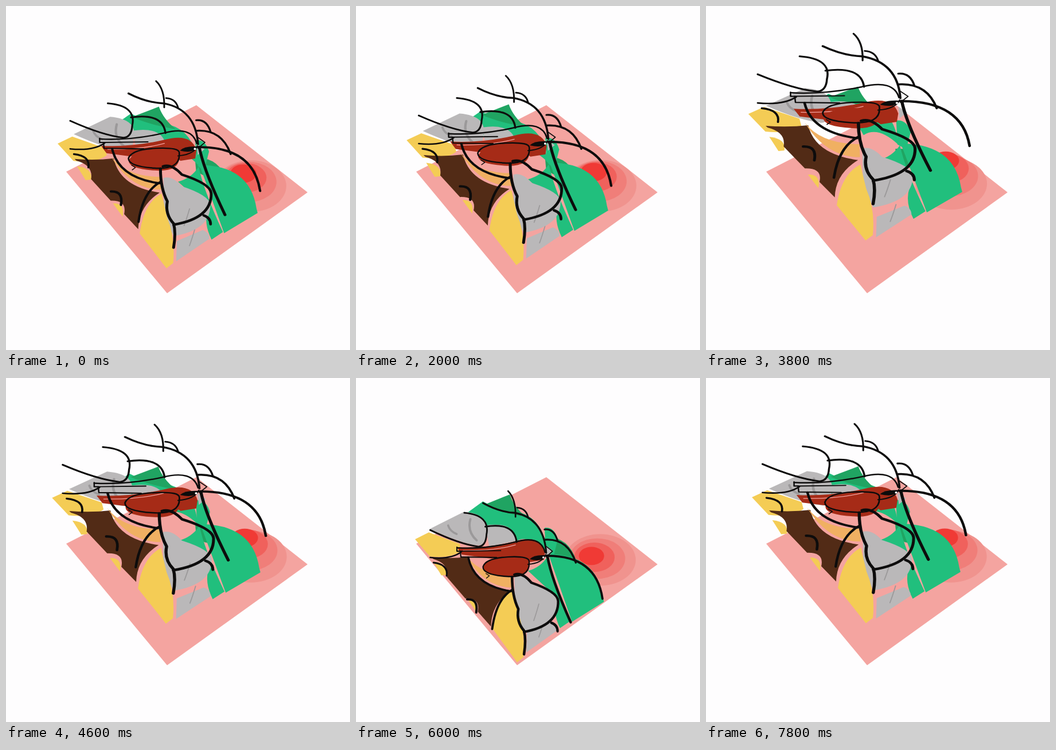
Recreate the animation shown at these times as an HTML page. Size 600x600 px, loop 8 s.

```html
<!DOCTYPE html>
<html lang="en">
<head>
<meta charset="utf-8">
<title>Layered bird</title>
<style>
html, body { margin: 0; width: 100%; height: 100%; overflow: hidden; background: #fefdfe; }
svg { display: block; width: 100%; height: 100%; }
</style>
</head>
<body>
<svg id="stage" viewBox="0 0 600 600"></svg>
<script>
const NS = 'http://www.w3.org/2000/svg';
const stage = document.getElementById('stage');
const INK = '#0d0c0c', GREEN = '#21bf7d', DARK = '#20a462', GREY = '#bab8b9',
      SHADE = '#9b999a', YELLOW = '#f4cc55', PEACH = '#f0b062', BROWN = '#522b16',
      RED = '#a62b17', PINK = '#f4a4a0';

function add(parent, tag, attrs) {
  const el = document.createElementNS(NS, tag);
  for (const k in attrs) el.setAttribute(k, attrs[k]);
  parent.appendChild(el);
  return el;
}

const layers = [];
function layer(rise) {
  const g = add(stage, 'g', {});
  layers.push({ g, rise });
  return g;
}

const ink = layer(1);
const fill = (g, color, d) => add(g, 'path', { d, fill: color });

// Strokes get heavier towards the viewer, judged by the y where they end
function pen(d, weight = 1, g = ink, color = INK) {
  const y = +d.match(/\d+$/)[0];
  add(g, 'path', {
    d, fill: 'none', stroke: color, 'stroke-width': weight * (2.4 + (y - 200) * .008),
    'stroke-linecap': 'round', 'stroke-linejoin': 'round'
  });
}

// A colour patch: the edge is also drawn in the ink layer, the rest only closes the fill
function patch(g, color, edge, rest = '', weight = 1) {
  fill(g, color, edge + rest + 'Z');
  pen(edge, weight);
}

function drawSun() {
  for (let i = 0; i < 4; i++) {
    const tone = 147 - 16 * i - 4.6 * i * i;
    add(layer(.05 + .077 * i), 'ellipse', {
      cx: 426 - 5 * i, cy: 317 - 2.7 * i, rx: 62 - 13.3 * i, ry: 45 - 9.7 * i,
      fill: `rgb(240,${tone},${tone - 5})`
    });
  }
}

function drawLeaves() {
  patch(layer(.2), DARK, 'M329 277Q370 274 384 317', 'L345 308L331 300');
  const far = layer(.42), near = layer(.47);
  patch(far, GREEN, 'M221 213Q250 229 277 230Q328 240 332 300',
    'Q300 268 277 284Q262 250 228 256L188 237');
  fill(far, DARK, 'M223 219L268 201Q275 222 296 240Q250 232 223 219Z');
  patch(far, GREEN, 'M329 259Q346 257 352 279', 'L345 308L331 300');
  patch(near, GREEN, 'M334 305Q341 345 375 421',
    'L356 434Q342 405 350 380L300 334Q322 328 334 309', 1.1);
  patch(near, GREEN, 'M332 305Q420 304 431 380', 'L433 388L377 423L338 311');
  pen('M265 192Q279 206 278 237');
  pen('M281 221Q296 222 300 237');
}

function drawStones() {
  const low = layer(.55), mid = layer(.61), high = layer(.65);
  patch(low, GREY, 'M341 422Q352 426 352 437', 'L297 476L298 441');
  patch(mid, GREY, 'M188 230Q234 234 227 268Q226 288 213 289Q180 285 128 260');
  patch(mid, GREY, 'M225 254Q276 246 280 281', 'L232 291');
  patch(high, GREY, 'M276 338Q290 333 306 352Q352 368 353 384Q354 427 293 438',
    'Q286 425 277 395');
  const crack = (g, x, y, w) => pen(`M${x} ${y}q-5 18 -9 29`, w, g, SHADE);
  pen('M199 243Q193 265 210 280', 1.3, mid, SHADE);
  pen('M160 254Q163 264 175 269', 1.2, mid, SHADE);
  crack(high, 319, 391, 1.6);
  crack(low, 328, 420, 1.6);
}

function drawEarth() {
  const sand = layer(.64), soil = layer(.72);
  patch(sand, YELLOW, 'M128 308Q165 312 183 298', 'L180 286L126 266L102 278', .8);
  patch(soil, BROWN, 'M195 308Q205 357 270 367',
    'Q236 390 235 430L212 404Q217 380 190 381L158 344Q162 320 134 312L131 309Q165 312 195 308');
  fill(soil, PEACH, 'M190 304Q215 340 272 340L273 362Q222 362 190 304Z');
  patch(sand, YELLOW, 'M134 317Q160 320 157 340', 'L148 341', .9);
  patch(sand, YELLOW, 'M193 381Q213 380 209 404');
  patch(sand, YELLOW, 'M273 364Q244 380 237 433', 'L281 493L292 484Q296 440 282 405', .9);
  pen('M272 342Q272 376 283 398Q279 420 293 436Q297 452 293 477');
}

function drawBird() {
  const body = layer(.8), wing = layer(.93);
  patch(body, RED, 'M175 291Q225 294 277 281Q322 268 330 299',
    'L328 313L304 317Q290 304 235 311L184 304', .75);
  patch(body, GREY, 'M330 287L343 297L332 307', '', .5);
  pen('M186 297Q240 298 278 287', .4, body, PINK);
  patch(wing, RED, 'M221 324Q226 309 265 307T302 316Q304 344 262 341T221 324', '', .7);
  pen('M175 290L175 297L181 297L182 307L245 308', .65);
  pen('M181 297L252 296', .6);
  pen('M300 320Q325 318 331 303', .6);
  pen('M226 336L232 340L227 344', .4);
  fill(ink, INK, 'M303 311Q310 303 330 304Q326 317 303 311Z');
  add(ink, 'circle', { cx: 327, cy: 308, r: 1.8, fill: '#fff' });
}

fill(layer(0), PINK, 'M105 289L332 173L526 325L281 501Z');
drawSun();
drawLeaves();
drawStones();
drawEarth();
drawBird();
stage.append(ink);

// The stack opens and closes like a bouncing sine
const LOOP = 8000, STEP = 200, SWING = 5245, FLAT = 945, HEIGHT = 161;
const lift = t => HEIGHT * Math.abs(Math.sin(Math.PI * (t - FLAT) / SWING)) ** 1.17;
const REST = lift(1200); // height at which the paths above are plotted

function draw(t) {
  const h = lift(t);
  for (const { g, rise } of layers) {
    const d = rise * (h - REST);
    const sx = (1 + .0016 * rise * h) / (1 + .0016 * rise * REST);
    const sy = 1 + .0003 * d;
    g.setAttribute('transform', `matrix(${sx} 0 0 ${sy} ${300 * (1 - sx)} ${-d * 1.075})`);
  }
}

const start = performance.now();
function tick() {
  const t = (performance.now() - start) % LOOP;
  draw(Math.floor(t / STEP) * STEP);
  requestAnimationFrame(tick);
}
tick();
</script>
</body>
</html>
```
